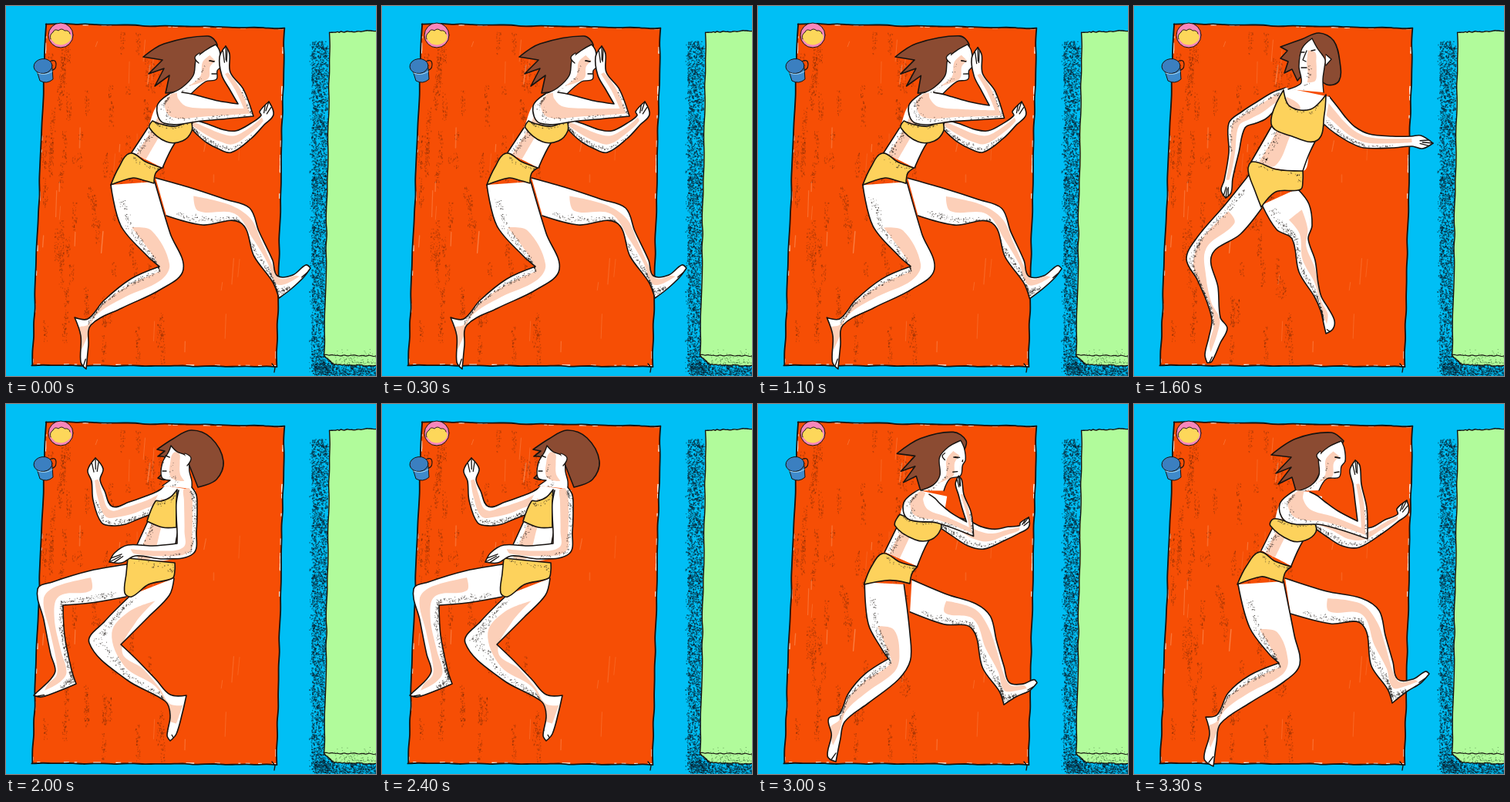
An HTML page with a canvas for the animation above (3.4 s loop, 480x480 px).

```html
<!DOCTYPE html>
<html lang="en">
<head>
<meta charset="utf-8">
<title>Restless sleeper</title>
<style>
html,body{margin:0;width:100%;height:100%;overflow:hidden;background:#00bff5}
canvas{display:block;width:480px;height:480px}
</style>
</head>
<body>
<canvas id="stage" width="480" height="480"></canvas>
<script>
const stage = document.getElementById('stage');
let g = stage.getContext('2d');
const INK = '#171310', PINK = '#fccfb8', YELLOW = '#fdd25c';

// Outlines per pose: asleep right, turning right, on back, asleep left, on back again.
const SHAPES = {
  hair: [
    '262,39 205,49 178,66 203,70 185,88 205,81 193,104 212,90 207,113 232,107 248,88 262,68 270,60 274,50',
    '256,37 210,45 178,66 204,69 184,90 204,82 187,104 205,95 211,116 230,107 241,90 255,66 266,58 272,48',
    '240,35 218,43 190,53 199,58 190,68 200,72 195,87 205,82 212,97 228,85 250,102 266,97 267,72 259,45',
    '240,34 217,45 196,59 206,61 197,68 207,70 207,84 197,96 207,98 238,80 249,108 273,98 282,74 266,44',
    '238,33 214,44 193,55 202,58 194,72 203,74 197,90 207,85 212,98 230,85 250,104 269,104 273,75 258,44'],
  face: [
    '210,115 228,106 243,90 247,68 258,58 272,50 277,58 279,78 274,84 273,95 259,98 240,114',
    '212,113 229,106 240,92 240,68 252,56 269,48 273,58 274,74 269,81 266,95 250,97 240,112',
    '200,108 216,101 217,94 214,78 218,55 231,42 238,55 244,63 248,70 247,80 245,95 246,112',
    '203,106 213,99 202,95 203,76 211,62 214,54 222,62 232,66 237,74 238,88 241,100 241,110',
    '199,108 215,102 213,95 210,78 216,56 229,43 237,56 242,64 245,71 244,82 243,97 247,115'],
  // left eye, right eye, mouth, nose, ear
  marks: [
    '264,71 270,72 264,71 270,72 267,88 273,88 279,78 279,78 279,78 250,74 245,67 251,61',
    '261,69 267,70 261,69 267,70 260,89 266,88 274,74 274,74 274,74 242,74 237,67 242,61',
    '217,60 221,60 230,58 235,57 217,80 224,80 224,58 219,70 223,72 249,63 256,69 249,77',
    '207,67 212,69 207,67 212,69 203,87 208,87 204,76 204,76 204,76 232,64 240,70 235,80',
    '213,69 218,69 224,66 231,66 212,84 218,85 219,66 214,77 218,79 245,64 251,70 245,79'],
  torso: [
    '212,114 194,132 184,158 163,190 203,210 219,178 242,152 246,118',
    '208,112 190,128 180,160 165,190 204,210 219,178 236,158 244,120',
    '197,106 190,112 179,155 152,202 219,214 228,190 246,155 254,118',
    '206,106 196,120 184,152 162,200 218,200 222,170 232,140 246,112',
    '197,108 190,118 181,158 160,204 221,214 226,190 240,158 252,118'],
  bra: [
    '190,149 200,153 220,156 240,148 241,162 229,175 208,176 186,158',
    '181,149 197,152 216,156 234,153 236,166 222,177 203,177 177,158',
    '194,109 202,130 229,134 249,115 247,140 238,174 205,169 178,153',
    '194,126 201,126 213,121 222,111 221,130 221,160 203,160 183,152',
    '201,110 205,129 229,134 249,117 243,143 237,171 208,170 182,157'],
  briefs: [
    '161,191 181,202 202,210 194,217 192,230 178,226 165,223 136,232 146,210',
    '163,192 183,204 204,211 196,219 193,232 178,227 165,224 134,234 146,210',
    '154,202 185,212 219,214 219,226 216,238 184,241 165,261 157,240 148,213',
    '158,200 188,203 219,206 219,216 216,226 185,234 163,250 154,245 156,220',
    '159,204 188,210 222,212 221,225 220,238 185,241 164,257 157,235 154,215'],
  legL: [
    '136,232 149,285 183,324 199,338 162,354 127,382 106,406 89,404 97,428 97,462 104,471 107,440 110,414 150,392 200,368 230,342 213,295 193,228',
    '135,234 150,290 175,324 188,336 150,352 122,375 108,403 93,406 98,428 91,460 103,470 107,440 112,415 150,388 195,360 215,338 208,300 194,230',
    '150,218 118,258 82,300 68,328 82,355 95,385 101,408 97,430 92,452 95,463 101,461 112,437 121,418 112,404 109,365 101,323 138,296 166,262',
    '157,208 110,216 60,231 41,240 49,280 58,325 64,346 57,358 40,374 36,378 46,380 72,371 91,363 85,345 76,300 74,261 110,258 156,250',
    '157,215 105,262 78,282 62,300 76,340 89,380 92,398 84,420 80,436 86,440 90,430 105,410 115,397 104,388 107,345 99,303 135,285 163,257'],
  legR: [
    '194,223 240,236 285,251 316,262 328,292 346,330 352,350 372,349 389,336 395,340 386,352 370,367 354,379 346,358 322,325 304,281 255,284 208,272',
    '196,226 250,243 295,252 318,268 326,300 336,335 342,357 362,357 378,347 383,350 372,362 354,373 335,388 329,370 308,340 296,286 255,285 203,272',
    '212,237 227,257 231,285 226,302 235,330 239,360 243,377 252,392 260,408 258,419 249,425 246,412 242,395 234,377 214,345 205,302 185,290 166,258',
    '218,226 212,248 185,276 149,312 170,332 195,358 213,377 234,378 229,400 221,428 213,437 209,430 213,404 207,386 157,358 108,310 128,282 162,248',
    '220,238 218,270 213,300 208,317 215,345 224,372 236,386 241,398 244,418 243,428 236,431 233,415 228,402 224,390 198,357 171,320 163,290 164,257'],
  armL: [
    '212,114 196,130 205,152 255,149 321,143 308,108 291,86 290,62 285,52 277,66 280,90 290,108 301,127 275,123 252,117 240,114 228,112',
    '209,112 189,130 198,153 245,157 303,175 302,135 295,104 293,80 287,73 280,86 284,104 287,128 290,152 265,139 248,127 238,119 228,114',
    '197,106 180,112 160,124 140,137 123,152 123,190 117,226 113,239 119,249 126,242 128,224 136,190 144,158 158,152 170,147 180,138 187,128',
    '208,106 195,114 180,120 160,127 138,133 128,113 122,98 126,84 116,70 106,86 111,100 113,125 124,154 140,158 155,156 170,150 185,144',
    '204,108 190,114 174,126 160,138 147,152 132,174 108,192 102,203 108,209 121,203 124,194 140,180 160,158 168,153 175,148 182,142 188,135'],
  armR: [
    '240,146 252,150 264,154 280,160 298,162 318,152 331,142 329,137 341,124 347,141 335,154 318,172 292,190 275,185 260,177 248,167 238,156',
    '238,150 255,150 272,153 290,160 308,160 326,150 342,143 341,136 354,125 356,141 342,153 322,168 292,186 270,184 250,172 240,165 230,158',
    '253,117 265,132 275,145 287,157 305,166 335,169 360,169 372,168 388,178 374,185 361,182 335,184 298,184 280,177 265,168 254,160 245,152',
    '241,108 247,118 248,135 247,165 243,194 205,201 168,197 150,206 134,205 141,193 158,183 190,184 222,181 222,165 221,145 221,128 224,112',
    '250,117 265,129 278,140 290,155 304,176 315,212 324,242 336,256 336,271 324,266 318,252 308,228 297,200 282,182 265,168 253,161 242,155']
};
for (const k in SHAPES)
  SHAPES[k] = SHAPES[k].map(s => s.split(' ').map(p => p.split(',').map(Number)));

const CYCLE = [0, 1, 2, 3, 4, 1, 0];
// [step of 100 ms, position in the cycle of poses]
const TIMING = [[0, 0], [6, 0], [11, .08], [12, .9], [13, 1.15], [16, 2], [18, 2.7],
  [19, 3], [24, 3], [28, 4], [30, 4.85], [31, 5], [34, 5]];

let seed = 1;
const rnd = () => (seed = seed * 16807 % 2147483647) / 2147483647;
const range = (a, b) => a + (b - a) * rnd();
const mix = (a, b, f) => [a[0] + (b[0] - a[0]) * f, a[1] + (b[1] - a[1]) * f];

function poseAt(step) {
  const i = TIMING.findIndex(k => k[0] > step);
  const [t0, a] = TIMING[i - 1], [t1, b] = TIMING[i];
  return a + (b - a) * (step - t0) / (t1 - t0);
}

function shape(name, s) {
  const i = Math.floor(s), a = SHAPES[name][CYCLE[i]], b = SHAPES[name][CYCLE[i + 1]];
  return a.map((p, j) => mix(p, b[j], s - i));
}

// Smooth path through the points; sharp turns stay corners.
function curve(pts, closed) {
  const n = pts.length, at = i => closed ? pts[(i + n) % n] : pts[Math.max(0, Math.min(n - 1, i))];
  const tangent = i => {
    const [a, p, b] = [at(i - 1), at(i), at(i + 1)];
    const turn = (p[0] - a[0]) * (b[0] - p[0]) + (p[1] - a[1]) * (b[1] - p[1]);
    const len = Math.hypot(p[0] - a[0], p[1] - a[1]) * Math.hypot(b[0] - p[0], b[1] - p[1]);
    const d = Math.hypot(b[0] - a[0], b[1] - a[1]) || 1;
    const k = turn > .1 * len ? .33 / d : 0;
    return [(b[0] - a[0]) * k, (b[1] - a[1]) * k];
  };
  const path = new Path2D();
  path.moveTo(...pts[0]);
  for (let i = 0; i < (closed ? n : n - 1); i++) {
    const p = at(i), q = at(i + 1), u = tangent(i), v = tangent(i + 1);
    const d = Math.hypot(q[0] - p[0], q[1] - p[1]);
    path.bezierCurveTo(p[0] + u[0] * d, p[1] + u[1] * d, q[0] - v[0] * d, q[1] - v[1] * d, ...q);
  }
  if (closed) path.closePath();
  return path;
}

function fill(path, color) { g.fillStyle = color; g.fill(path); }
function ink(path, width = 1.6) { g.strokeStyle = INK; g.lineWidth = width; g.stroke(path); }
function line(...pts) { ink(curve(pts), 1.3); }
function dot(x, y, r, color) {
  const p = new Path2D();
  p.arc(x, y, r, 0, 7);
  fill(p, color);
}

// Points across a part: u runs along it, f from one edge to the other.
function across(pts, u, f) {
  const i = Math.floor(u), n = pts.length - 1;
  return mix(mix(pts[i], pts[i + 1], u - i), mix(pts[n - i], pts[n - i - 1], u - i), f);
}

function stripe(pts, from, to, f0, f1) {
  const edge = [], back = [];
  for (let u = from; u <= to; u++) {
    edge.push(across(pts, u, f0));
    back.unshift(across(pts, u, f1));
  }
  fill(curve(edge.concat(back), true), PINK);
}

function specks(pts, from, to, f0, f1, count) {
  g.fillStyle = 'rgba(35,30,28,.6)';
  for (let i = 0; i < count; i++) {
    const [x, y] = across(pts, range(from, to), f0 + (f1 - f0) * (rnd() + rnd()) / 2);
    g.fillRect(x, y, range(.5, 1.6), range(.5, 1.6));
  }
}

function limb(name, s, shadeRight) {
  const pts = shape(name, s), path = curve(pts), leg = name[0] === 'l';
  fill(path, '#fff');
  g.save();
  g.clip(path);
  stripe(pts, leg ? 1 : 0, leg ? 7 : 6, .22, .62);
  const f = shadeRight ? .72 : .03;
  specks(pts, .3, leg ? 6 : 5, f, f + .25, leg ? 330 : 120);
  g.restore();
  ink(path);
  if (leg) {
    const toe = pts[10], ball = mix(pts[8], pts[11], .5);
    line(mix(pts[9], toe, .5), mix(toe, ball, .35));
  } else {
    const palm = mix(pts[6], pts[10], .5);
    for (const f of [.15, .5, .85]) {
      const tip = f < .5 ? mix(pts[7], pts[8], .6) : f > .5 ? mix(pts[8], pts[9], .45) : pts[8];
      line(tip, mix(tip, palm, .5));
    }
  }
}

const parts = {
  torso(s) {
    const p = shape('torso', s);
    fill(curve(p), '#fff');
    g.save();
    g.clip(curve(p));
    stripe(p, 1, 3, .14, .46);
    specks(p, 2, 3, .05, .3, 60);
    g.restore();
    ink(curve(p.slice(2, 4)));
    ink(curve(p.slice(4, 7)));
  },
  cloth(name, s) {
    const p = shape(name, s), path = curve(p, true);
    fill(path, YELLOW);
    g.save();
    g.clip(path);
    specks(p, .2, 3, .02, .2, 28);
    g.restore();
    ink(path);
  },
  bra(s) { parts.cloth('bra', s); },
  briefs(s) { parts.cloth('briefs', s); },
  head(s) {
    const hair = curve(shape('hair', s), true), p = shape('face', s), face = curve(p);
    const m = shape('marks', s);
    fill(hair, '#8b4b32');
    ink(hair);
    fill(face, '#fff');
    g.save();
    g.clip(face);
    stripe(p, 1, 4, .3, .66);
    specks(p, 0, 3, .2, .5, 22);
    g.restore();
    ink(face, 1.4);
    const ear = curve(m.slice(9));
    fill(ear, '#fff');
    ink(ear, 1.3);
    line(m[0], m[1]);
    line(m[2], m[3]);
    line(m[4], m[5]);
    line(m[6], m[7], m[8]);
  }
};

const ORDERS = {
  right: 'armR legR torso bra legL briefs head armL',
  back: 'armL armR legL legR torso bra briefs head',
  left: 'armL legL torso bra legR briefs head armR'
};

function sleeper(s) {
  const side = s < 1.5 || s > 4.6 ? 'right' : s > 2.5 && s < 3.5 ? 'left' : 'back';
  for (const name of ORDERS[side].split(' ')) {
    if (parts[name]) parts[name](s);
    else limb(name, s, name === 'legR' || (side === 'left') === (name !== 'armR'));
  }
  if (side === 'back') {
    const t = shape('torso', s);
    dot(...mix(mix(t[3], t[4], .28), t[2], .12), 1.2, INK);
  }
}

function roughEdge(pts, width) {
  for (let i = 0; i < pts.length - 1; i++) {
    const row = [];
    for (let k = 0; k <= 24; k++) {
      const [x, y] = mix(pts[i], pts[i + 1], k / 24);
      row.push([x + range(-.7, .7), y + range(-.7, .7)]);
    }
    ink(curve(row), width);
  }
}

function scenery() {
  seed = 77;
  g.fillStyle = '#00bff5';
  g.fillRect(0, 0, 480, 480);

  const corners = [[52, 23], [361, 29], [351, 468], [34, 466], [52, 23]];
  const towel = new Path2D('M52 23L361 29L351 468L34 466Z');
  fill(towel, '#f64e05');
  g.save();
  g.clip(towel);
  for (let i = 0; i < 75; i++) {
    const x = range(48, 205), y = range(30, 430), h = range(8, 60);
    g.fillStyle = 'rgba(75,30,10,.3)';
    for (let k = 0; k < h * .9; k++)
      g.fillRect(x + range(-3, 3), y + range(0, h), range(.6, 1.6), range(.6, 2.4));
  }
  for (let i = 0; i < 32; i++) {
    const x = range(48, 345), y = range(35, 450);
    g.strokeStyle = `rgba(255,190,150,${range(.15, .5)})`;
    g.lineWidth = range(.6, 1.7);
    g.beginPath();
    g.moveTo(x, y);
    g.lineTo(x - range(0, 3), y + range(5, 40));
    g.stroke();
  }
  g.fillStyle = '#fff3e8';
  for (let i = 0; i < 50; i++) {
    const k = i % 4, [x, y] = mix(corners[k], corners[k + 1], rnd()), w = range(3, 12);
    if (k % 2) g.fillRect(x - 2, y, 3.2, w);
    else g.fillRect(x, y - 2, w, 3.4);
  }
  g.restore();
  roughEdge(corners, 1.8);
  ink(new Path2D('M345 464L349 469L348 475'), 1.4);

  for (let i = 0; i < 3600; i++) {
    const low = i % 6 === 0;
    const x = low ? range(400, 480) : 419 - 23 * Math.pow(rnd(), .8) - (rnd() < .1 ? 3 : 0);
    const y = low ? range(462, 479) : range(45, 477);
    g.fillStyle = 'rgba(10,35,50,.65)';
    g.fillRect(x, y, range(.7, 2.2), range(.7, 2.2));
  }
  fill(new Path2D('M420 34L481 32V467L425 465L413 454Z'), '#b1fb9b');
  roughEdge([[481, 32], [420, 34], [413, 454], [425, 465], [481, 467]], 1.4);
  roughEdge([[413, 453], [481, 454]], 1.2);
  g.fillStyle = 'rgba(30,70,30,.5)';
  for (let i = 0; i < 120; i++) g.fillRect(range(425, 480), 464 - 22 * rnd() * rnd(), 1, 1);

  // doughnut
  dot(71, 38, 16, '#f786bb');
  fill(new Path2D('M58 43Q56 37 61 34Q63 29 68 32Q72 28 76 32Q82 31 83 36Q87 41 82 46Q74 53 64 49Z'), '#fdd75a');
  ink(new Path2D('M58 43Q56 37 61 34Q63 29 68 32Q72 28 76 32Q82 31 83 36'), .9);
  const ring = new Path2D();
  ring.arc(71, 38, 16, 0, 7);
  ink(ring, 1);

  // cup
  const handle = new Path2D('M57 72Q65 68 65 76Q65 84 57 83');
  ink(handle, 1.1);
  const cup = new Path2D('M40 84L44 97Q53 102 61 95L60 80Z');
  fill(cup, '#3e8acb');
  ink(cup, 1);
  const rim = new Path2D();
  rim.ellipse(48, 78, 12, 9.5, -.1, 0, 7);
  fill(rim, '#3b7fc0');
  ink(rim, 1);
  g.strokeStyle = '#a8d8f0';
  g.stroke(new Path2D('M41 87Q51 91 60 85'));
}

g.lineJoin = g.lineCap = 'round';
const view = g, backdrop = document.createElement('canvas');
backdrop.width = backdrop.height = 480;
g = backdrop.getContext('2d');
g.lineJoin = g.lineCap = 'round';
scenery();
g = view;

let shown = -1;
function draw(now) {
  const step = Math.floor(now / 100) % 34;
  if (step !== shown) {
    shown = step;
    seed = 911 + step % 3 * 53;
    g.drawImage(backdrop, 0, 0);
    sleeper(poseAt(step));
  }
  requestAnimationFrame(() => draw(performance.now()));
}
draw(0);
</script>
</body>
</html>
```
